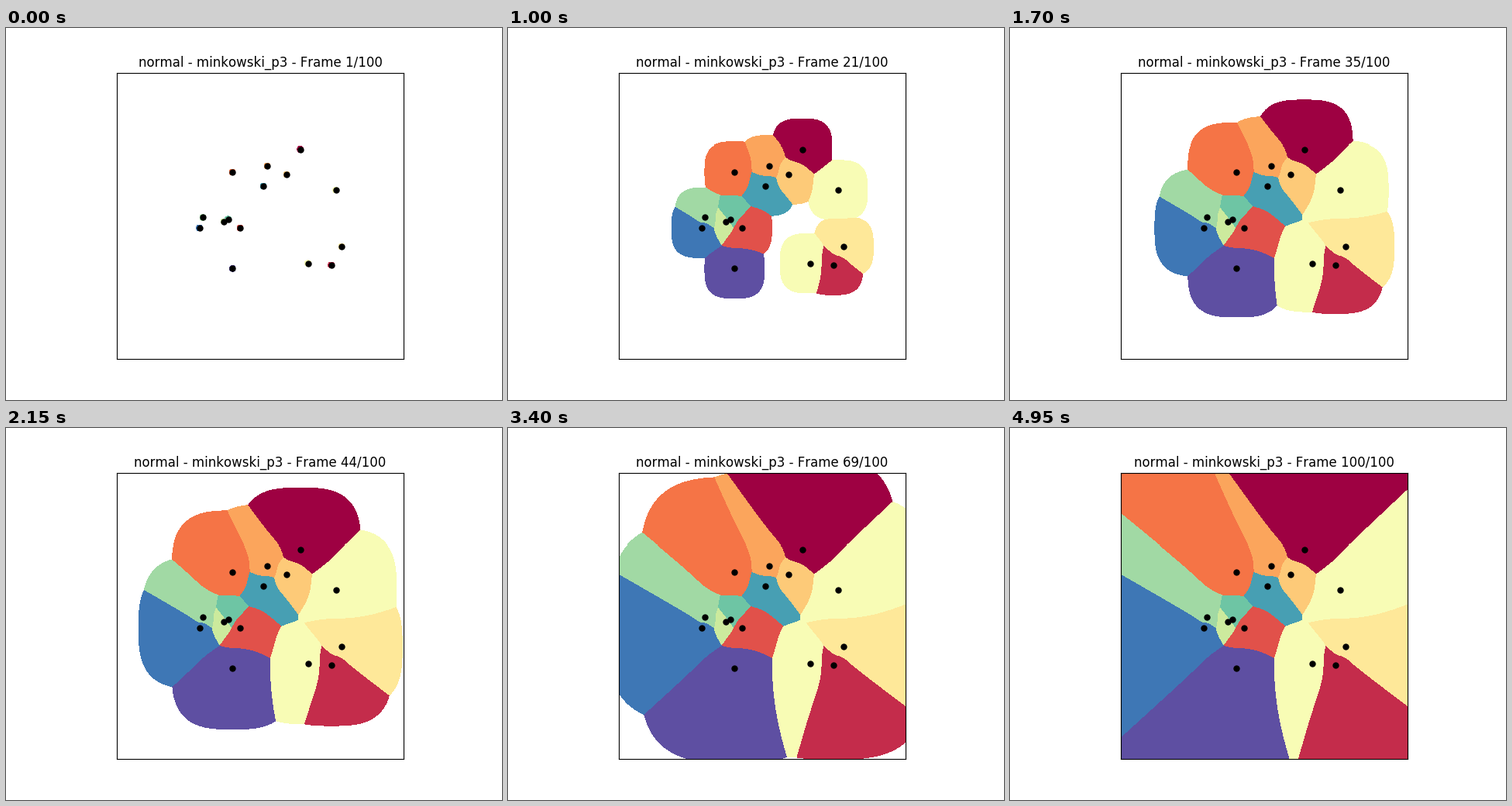
A matplotlib script for the animation above (5000 ms loop, 640 by 480 pixels).

```python
import matplotlib.pyplot as plt
import numpy as np
from matplotlib.animation import FuncAnimation

plt.rcParams["text.kerning_factor"] = 6  # plain letter advances, no pair kerning

FRAMES = 100
P = 3
START_RADIUS = 4.2
LEFT, TOP, SIZE = 143, 57, 371  # pixel block behind the axes

# Sites in stage pixels, in colour map order
SITES = np.array([
    (379.6, 156.5), (419.6, 305.9), (302, 258), (292.3, 186), (336.7, 178),
    (362, 189), (433, 282.3), (425.5, 209.2), (389.5, 303.6), (281.3, 249.7),
    (254, 244.4), (286.5, 246.6), (331.7, 204), (249.5, 258), (292.3, 310.4),
])


def site_colors():
    colors = plt.get_cmap("Spectral")(np.linspace(0, 1, len(SITES)))[:, :3]
    # The two pale middle cells share one tone
    colors[7:9] = np.average(colors[7:9], axis=0, weights=(2, 1))
    return colors


def site_distances():
    """Minkowski distance from every pixel centre to every site."""
    steps = np.arange(SIZE) + 0.5
    dx = np.abs(LEFT + steps[None, :, None] - SITES[:, 0])
    dy = np.abs(TOP + steps[:, None, None] - SITES[:, 1])
    return (dx ** P + dy ** P) ** (1 / P)


dist = site_distances()
nearest = dist.min(axis=2)
cells = site_colors()[dist.argmin(axis=2)]
radii = np.linspace(START_RADIUS, nearest.max(), FRAMES)

fig, ax = plt.subplots(figsize=(6.4, 4.8), dpi=100)
image = ax.imshow(np.ones_like(cells), interpolation="nearest",
                  extent=(LEFT, LEFT + SIZE, TOP + SIZE, TOP))
ax.plot(*SITES.T, "ko", markersize=5)
ax.set(xlim=(143.2, 512.8), ylim=(427.2, 57.6), xticks=[], yticks=[])
title = ax.set_title("")


def update(i):
    reached = nearest <= radii[i]
    image.set_data(np.where(reached[..., None], cells, 1.0))
    title.set_text(f"normal - minkowski_p{P} - Frame {i + 1}/{FRAMES}")
    return image, title


anim = FuncAnimation(fig, update, frames=FRAMES, interval=50, repeat=True)
plt.show()
```
